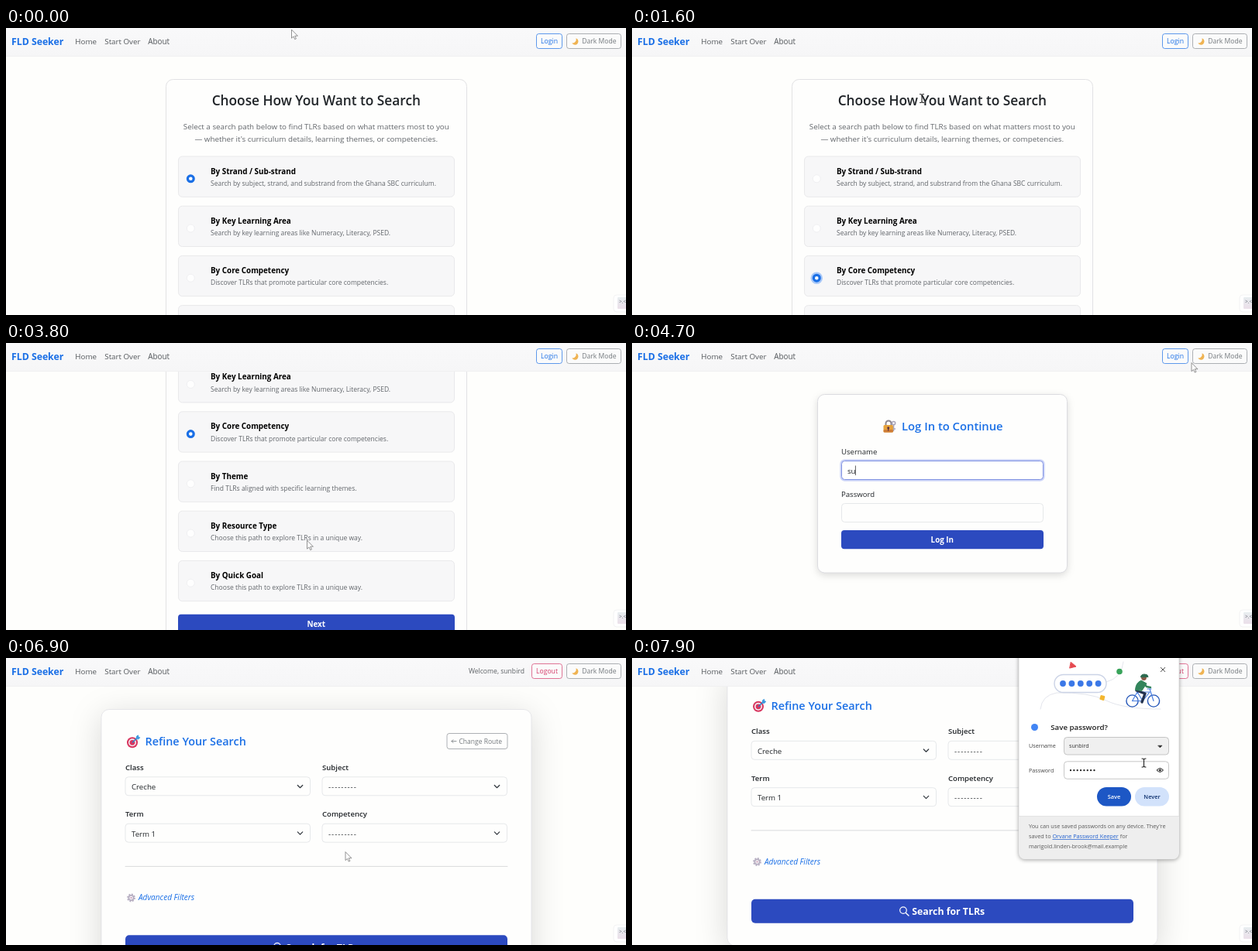
Animation, 800 px wide and 371 px high, one loop 8000 ms. Source, as an HTML page:

```html
<!DOCTYPE html>
<html lang="en">
<head>
<meta charset="utf-8">
<title>FLD Seeker</title>
<style>
  html, body { margin: 0; width: 100%; height: 100%; overflow: hidden; background: #fefefc; }
  svg { display: block; width: 100vw; height: 100vh; font-family: "Open Sans", "Noto Sans", sans-serif; }
  .card { filter: drop-shadow(0 3px 5px #0002); }
  .wide { filter: drop-shadow(0 8px 20px #00000026); }
  .popup { filter: drop-shadow(0 1px 2.5px #0005); }
</style>
</head>
<body>
<svg id="stage" viewBox="0 0 800 371" xmlns="http://www.w3.org/2000/svg"></svg>
<script>
const LOOP = 8000, STEP = 100;
const USER = 'sunbird';
const BLUE = '#1a6fe6', NAVY = '#2c4abf', INK = '#212529', GRAY = '#62666b';

const text = (x, y, size, str, fill = INK, extra = '') =>
  `<text x="${x}" y="${y}" font-size="${size}" fill="${fill}" ${extra}>${str}</text>`;
const rect = (x, y, w, h, r, fill, stroke = 'none', extra = '') =>
  `<rect x="${x}" y="${y}" width="${w}" height="${h}" rx="${r}" fill="${fill}" stroke="${stroke}" ${extra}/>`;
const circle = (x, y, r, fill, stroke = 'none', width = 1) =>
  `<circle cx="${x}" cy="${y}" r="${r}" fill="${fill}" stroke="${stroke}" stroke-width="${width}"/>`;
const path = (d, stroke, width = 1, fill = 'none') =>
  `<path d="${d}" fill="${fill}" stroke="${stroke}" stroke-width="${width}" stroke-linecap="round" stroke-linejoin="round"/>`;
const group = (id, body) => `<g id="${id}">${body}</g>`;
const dots = (n, x, y, gap, r, fill) =>
  Array.from({ length: n }, (_, i) => circle(x + i * gap, y, r, fill)).join('');

const MID = 'text-anchor="middle"', BOLD = 'font-weight="700"', SEMI = 'font-weight="600"';
const THIN = 'stroke-width=".7"';

const options = [
  ['By Strand / Sub-strand', 'Search by subject, strand, and substrand from the Ghana SBC curriculum.'],
  ['By Key Learning Area', 'Search by key learning areas like Numeracy, Literacy, PSED.'],
  ['By Core Competency', 'Discover TLRs that promote particular core competencies.'],
  ['By Theme', 'Find TLRs aligned with specific learning themes.'],
  ['By Resource Type', 'Choose this path to explore TLRs in a unique way.'],
  ['By Quick Goal', 'Choose this path to explore TLRs in a unique way.'],
];
const optionY = i => 166 + i * 64.2;

function choosePage() {
  const rows = options.map(([title, note], i) => {
    const y = optionY(i);
    return rect(222.5, y, 356, 52.3, 5, '#f7f7f8', '#e9e9eb')
      + circle(238.3, y + 28.8, 5, '#fefefe', '#ececef', .8)
      + text(264, y + 22.6, 9.85, title, '#000', BOLD)
      + text(264, y + 38, 8.52, note, GRAY);
  }).join('');
  const mark = group('focusRing', circle(0, 0, 7.7, '#a8c8f8')) + circle(0, 0, 3.9, '#fff', BLUE, 3.2);
  return rect(206.5, 66.5, 388, 535, 9, '#fefefd', '#e2e2e4')
    + text(400.3, 100, 17.3, 'Choose How You Want to Search', INK, `${MID} ${SEMI}`)
    + text(400.3, 131, 9.83, 'Select a search path below to find TLRs based on what matters most to you', GRAY, MID)
    + text(400.3, 146.5, 9.83, '— whether it\'s curriculum details, learning themes, or competencies.', GRAY, MID)
    + rows + group('radio', mark)
    + rect(222, 556.3, 357, 25, 4, NAVY)
    + text(400.3, 572.6, 9.9, 'Next', '#fff', `${MID} ${BOLD}`);
}

const field = (x, y, w) => rect(x + .5, y + .5, w, 24, 4, '#fefefd', '#e6e8ea');

function loginPage() {
  const lock = path('M327.5 107v-3a3.5 3.5 0 0 1 7 0v3', '#8d8790', 2)
    + rect(324.5, 106, 12.5, 9.6, 1.5, '#e6a23c') + rect(324.5, 112, 12.5, 3.6, 1.5, '#cf7d35')
    + circle(330.7, 109.7, 1.5, '#5d3142') + path('M330.7 110v3', '#5d3142', 1.3)
    + circle(337.6, 103.6, 2.1, 'none', '#a9a4b8', 1.5) + path('M337.6 106v7.5M338 111h1.5', '#a9a4b8', 1.4);
  return rect(239.5, 66.5, 322, 230.5, 9, '#fefefd', '#dcdce0', 'class="card"')
    + lock + text(348, 113, 14.8, 'Log In to Continue', BLUE, SEMI)
    + text(270, 143.7, 9.6, 'Username') + field(270, 152, 260)
    + text(270, 198.9, 9.6, 'Password') + field(270, 207, 260)
    + group('focusBox', rect(269.5, -.5, 262, 26, 5, 'none', '#cdd5f8', 'stroke-width="2.4"')
      + rect(270.5, .5, 260, 24, 4, '#fff', '#7f91e2'))
    + text(278, 168.6, 9.7, '', INK, 'id="typed"') + group('secret', '')
    + '<path id="caret" stroke="#333" stroke-width=".8"/>'
    + rect(270, 242, 261, 24.3, 4, NAVY, 'none', 'id="submit"')
    + text(400.3, 258, 9.8, 'Log In', '#fff', `${MID} ${BOLD}`);
}

function refinePage() {
  const EMPTY = '<tspan letter-spacing=".1em">---------</tspan>';
  const select = (x, y, label, value) => text(x, y - 8.6, 9.6, label, INK, SEMI)
    + field(x - .5, y, 238.5) + text(x + 8, y + 17, 9.7, value)
    + path(`M${x + 222.3} ${y + 11.2}l3.2 3.2l3.2 -3.2`, '#343a40', 1.25);
  const target = circle(163, 109.3, 7, '#d8365f') + circle(163, 109.3, 5, '#f4eef2')
    + circle(163, 109.3, 3.4, '#d8365f') + path('M163.5 109L169.5 102.8', '#3183c8', 1.5)
    + path('M168.2 104.2l.3-3 2-1.3.4 2.4 1.8.5-1.7 1.9z', '#3c9be0', 1, '#3c9be0');
  const gear = '<circle cx="161.5" cy="310" r="4.5" fill="none" stroke="#b7afc2" stroke-width="1.8" stroke-dasharray="2 1.5"/>'
    + circle(161.5, 310, 3.1, 'none', '#b7afc2', 1.8) + circle(161.5, 310, 1.1, '#c48fae');
  return rect(123, 66.5, 555, 352, 10, '#fefefd', '#dfdfe2', `class="wide" ${THIN}`)
    + target + text(179.5, 113.2, 14.4, 'Refine Your Search', BLUE, SEMI)
    + rect(569, 97.5, 78, 20, 3, '#fefefd', '#8b9096', THIN)
    + path('M581 107.6h-6m2-2l-2 2l2 2', '#73787d', .8) + text(584.5, 110.8, 8.5, 'Change Route', '#73787d')
    + select(154, 153.3, 'Class', 'Creche') + select(408, 153.3, 'Subject', EMPTY)
    + select(154, 213.7, 'Term', 'Term 1') + select(408, 213.7, 'Competency', EMPTY)
    + path('M154 269.4H647', '#d9dadc')
    + gear + text(171, 313.4, 10.1, 'Advanced Filters', BLUE, 'font-style="italic"')
    + rect(154, 358.3, 493, 31, 5, NAVY)
    + circle(350, 372.6, 4.3, 'none', '#fff', 1.2) + path('M353.3 376L357 379.6', '#fff', 1.4)
    + text(361.3, 378.6, 12.3, 'Search for TLRs', '#fff', BOLD);
}

function navBar() {
  const button = (x, w, color) => rect(x, 7.5, w, 19, 3, '#fbfbfb', color, THIN);
  return rect(0, 0, 800, 36.5, 0, 'url(#navFill)') + path('M0 36.5H800', '#f0f0f1')
    + text(7, 22, 12.25, 'FLD Seeker', BLUE, BOLD)
    + text(89.3, 21.2, 9.75, 'Home', '#53575b') + text(127.3, 21.2, 9.75, 'Start Over', '#53575b')
    + text(183.3, 21.2, 9.9, 'About', '#53575b')
    + group('guest', button(684.5, 33, BLUE) + text(701, 20.2, 8.7, 'Login', BLUE, MID))
    + group('member', text(597, 20.2, 8.6, `Welcome, ${USER}`, '#5d6165')
      + button(678.5, 39, '#d53c6a') + text(698, 20.2, 8.6, 'Logout', '#d53c6a', MID))
    + button(723.5, 70, '#8b9096')
    + path('M735.5 13.2a4.4 4.4 0 1 1-5.2 6.4a5 5 0 0 0 5.2-6.4z', 'none', 0, '#efb352')
    + text(743.3, 20.2, 8.6, 'Dark Mode', '#73787d');
}

function savePrompt() {
  const cyclist = circle(645.5, 55.5, 7.6, 'none', '#2456b8', 1.4) + circle(673, 55.5, 7.6, 'none', '#2456b8', 1.4)
    + path('M645.5 55.5L652 44H668L659 55.5L652 44M668 40L673 55.5M659 55.5H645.5M665 40h5', '#4a7fe0', 1.2)
    + path('M651 42L662 46L658 57', '#23324f', 3.4)
    + path('M649.5 41Q650 32 657 29L664 33L658 42Z', '#33855c', 1, '#33855c')
    + path('M660 32L664 37L669 38', '#33855c', 2.4)
    + circle(660.5, 25.5, 3.4, '#8a5a48') + path('M656.5 24.5q0-3.5 5-3.5q4 0 4.5 3z', '#2c6b50', 1, '#2c6b50');
  const art = path('M527 66Q529 48 548 45Q590 44 612 55T682 66', '#e0e3ea', .9)
    + path('M612 31Q632 26 634 5', '#e0e3ea', .9)
    + rect(545, 21.5, 67, 23, 11.5, '#fff', '#cbd3e6', 'stroke-width="1.4"') + dots(5, 556, 33, 11.4, 3.9, '#3b78e7')
    + path('M566.5 5.5L573 11L565 13Z', '#e5484f', 1, '#e5484f') + circle(629, 17.5, 3.8, '#38a35a')
    + rect(604, 48.5, 6, 6, 1, '#f3b62f', 'none', 'transform="rotate(15 607 51)"') + cyclist;
  const pill = (x, label, fill, ink) => rect(x, 167, 44, 24.5, 12.2, fill)
    + text(x + 22, 182, 7.4, label, ink, `${MID} ${SEMI}`);
  const box = (y, fill) => rect(557.5, y, 135, 22.5, 4, fill, '#b0b0b0', THIN);
  return rect(499, -12, 207, 272, 8, '#fff', '#cfcfcf', `class="popup" ${THIN}`)
    + path('M499.3 204.5H705.7V252a8 8 0 0 1-8 8H507.3a8 8 0 0 1-8-8Z', 'none', 0, '#eeeeee')
    + path('M499.3 204.5H705.7', '#dcdcdc', .7) + art
    + path('M682.3 12.3l5.4 5.4m0-5.4l-5.4 5.4', '#555', 1)
    + circle(519.5, 89.5, 4.5, '#4285f4')
    + text(540.3, 93.2, 9.7, 'Save password?', '#1f1f1f', SEMI)
    + text(512, 116.4, 7.2, 'Username', '#444') + box(102.5, '#f0f0f0')
    + text(564, 116.4, 7.2, USER, '#333') + path('M679 113.2h5l-2.5 2.5z', '#222', .6, '#222')
    + text(512, 147.6, 7.2, 'Password', '#444') + box(133.8, '#fff')
    + dots(8, 566, 145.2, 4.35, 1.15, '#222')
    + path('M677.3 145q4-5 8 0q-4 5-8 0z', '#333', 1.2) + circle(681.3, 145, 1.6, '#333')
    + pill(600, 'Save', '#1d57c5', '#fff') + pill(649, 'Never', '#d2e2fb', '#0c2f6d')
    + text(512, 220, 7.28, 'You can use saved passwords on any device. They\'re', '#5b5b5b')
    + text(512, 233.2, 7.28, 'saved to <tspan fill="#2160cf" text-decoration="underline">Orvane Password Keeper</tspan> for', '#5b5b5b')
    + text(512, 246.3, 7.28, 'marigold.linden-brook@mail.example', '#5b5b5b');
}

const corner = rect(784, 345, 20, 22, 4, '#fff', '#f3f3f3') + rect(789, 348, 16, 15, 1, 'url(#chip)')
  + text(791, 355.5, 6.5, '&gt;.&lt;', '#666b76');

const pointer = group('arrow', path('M0 0V10.6L2.5 8.4L4.2 12.1L5.9 11.3L4.2 7.7H7.5Z', '#666', .7, '#fff'))
  + group('beam', path('M-2.5-5.5Q0-5.5 0-4Q0-5.5 2.5-5.5M0-4V4M-2.5 5.5Q0 5.5 0 4Q0 5.5 2.5 5.5', '#222', 1.1));

const stage = document.getElementById('stage');
stage.innerHTML = `<defs>
  <linearGradient id="navFill" x2="0" y2="1"><stop stop-color="#f9f9fa"/><stop offset="1" stop-color="#f6f6f7"/></linearGradient>
  <linearGradient id="chip" x2="0" y2="1"><stop stop-color="#e8eef0"/><stop offset="1" stop-color="#ebdfe9"/></linearGradient></defs>`
  + rect(0, 0, 800, 371, 0, '#fefefc')
  + group('choose', choosePage()) + group('login', loginPage()) + group('refine', refinePage())
  + navBar() + corner + group('prompt', savePrompt()) + group('cursor', pointer);

const el = {};
stage.querySelectorAll('[id]').forEach(node => el[node.id] = node);

// Eased value along [time, ...values] stops
function along(stops, t) {
  const next = stops.findIndex(s => s[0] > t);
  if (next === 0) return stops[0].slice(1);
  if (next < 0) return stops[stops.length - 1].slice(1);
  const a = stops[next - 1], b = stops[next];
  const p = (t - a[0]) / (b[0] - a[0]), e = p * p * (3 - 2 * p);
  return a.slice(1).map((v, i) => v + (b[i + 1] - v) * e);
}

const cursorStops = [
  [0, 368.5, 2.5], [200, 368.5, 2.5], [900, 300, 318], [1100, 300, 318], [1600, 374, 91], [1900, 374, 91],
  [2300, 520, 250], [2700, 455.5, 178.5], [3000, 455.5, 178.5], [3600, 388.5, 255.5], [3800, 388.5, 255.5],
  [4200, 704, 17], [4400, 704, 17], [4500, 722, 26], [5400, 722, 26], [5800, 344.5, 167.5], [5900, 344.5, 167.5],
  [6200, 410, 254], [6500, 410, 254], [6900, 438, 251], [7500, 438, 251], [7900, 660.5, 135.5],
];
const chooseScroll = [[2700, 0], [2800, 76.5], [2900, 76.5], [3200, 205.6]];
const refineScroll = [[7200, 0], [7500, 46.5]];

const show = (node, on) => node.setAttribute('display', on ? 'inline' : 'none');
const move = (node, x, y) => node.setAttribute('transform', `translate(${x} ${y})`);
const within = (t, from, to) => t >= from && t < to;
const typedCount = (t, start, rate, max) => Math.max(0, Math.min(max, Math.floor((t - start) / rate) + 1));

function update(t) {
  show(el.choose, t < 4400);
  show(el.login, within(t, 4400, 6400));
  show(el.refine, t >= 6400);
  show(el.guest, t < 6400);
  show(el.member, t >= 6400);
  show(el.prompt, t >= 7000);
  move(el.choose, 0, -along(chooseScroll, t)[0]);
  move(el.refine, 0, -along(refineScroll, t)[0]);

  move(el.radio, 238.3, optionY(t < 1000 ? 0 : 2) + 28.8);
  show(el.focusRing, within(t, 1000, 3700));

  const inSecret = t >= 5300;
  const letters = typedCount(t, 4600, 100, USER.length);
  const hidden = typedCount(t, 5300, 80, 6);
  show(el.focusBox, t >= 4600);
  move(el.focusBox, 0, inSecret ? 207 : 152);
  el.typed.textContent = USER.slice(0, letters);
  el.secret.innerHTML = dots(hidden, 280.3, 220, 4.25, 1.3, INK);
  const caretX = 278.5 + (inSecret ? hidden * 4.25 : letters * 4.95);
  el.caret.setAttribute('d', `M${caretX} ${inSecret ? 213.5 : 158.5}v12.5`);
  show(el.caret, t >= 4600);
  el.submit.setAttribute('fill', t >= 6200 ? '#2541ad' : NAVY);

  move(el.cursor, ...along(cursorStops, t));
  const overText = within(t, 1500, 2000) || within(t, 5700, 6000) || t >= 7800;
  show(el.beam, overText);
  show(el.arrow, !overText);
}

function frame() {
  const t = performance.now() % LOOP;
  update(Math.floor(t / STEP) * STEP);
  requestAnimationFrame(frame);
}
frame();
</script>
</body>
</html>
```
